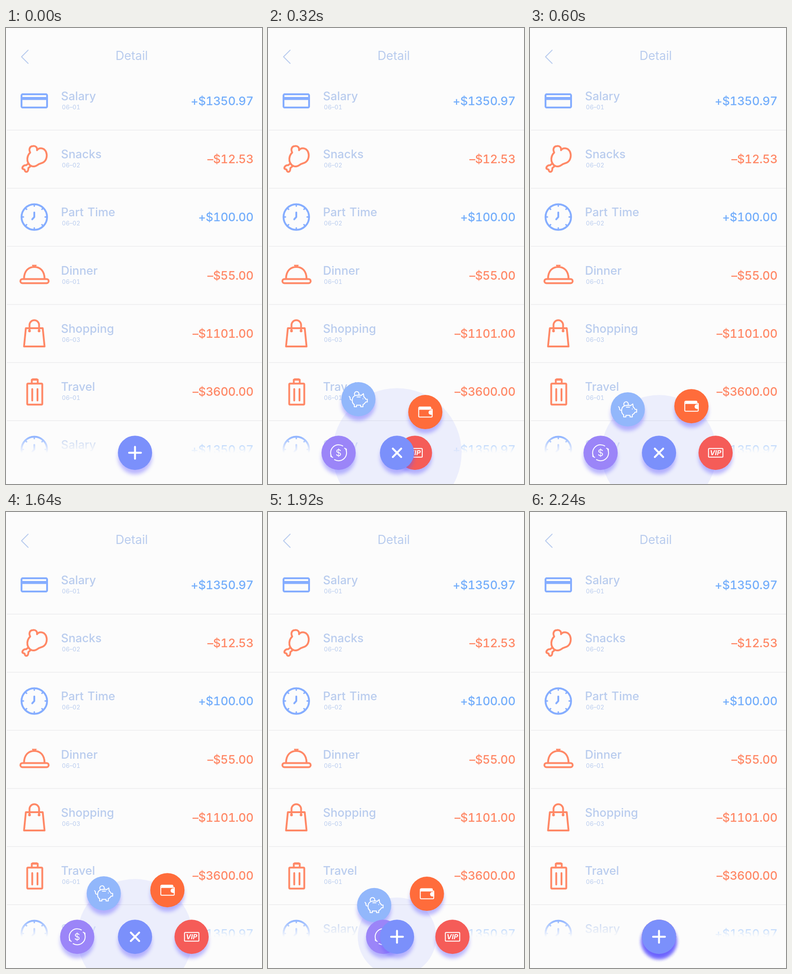
An HTML page that plays this animation: 561x998 px, repeating every 4.24 s.

```html
<!DOCTYPE html>
<html lang="en">
<head>
<meta charset="utf-8">
<title>Detail</title>
<style>
  html, body { margin: 0; width: 100%; height: 100%; overflow: hidden; background: #fcfcfc; }
  svg { display: block; width: 100%; height: 100%; }
  text { font-family: Inter, "Noto Sans", sans-serif; font-variant-numeric: tabular-nums; }
  .name { font-size: 25.5px; font-weight: 500; word-spacing: 1.5px; fill: #b9ccee; }
  .date { font-size: 13px; fill: #b9ccee; }
  .sum { font-size: 26px; font-weight: 500; letter-spacing: -.5px; text-anchor: end; }
  .line { fill: none; stroke-linecap: round; stroke-linejoin: round; }
  .white { stroke: #fff; stroke-width: 2; }
</style>
</head>
<body>
<svg viewBox="0 0 561 998">
  <defs>
    <linearGradient id="fade" x1="0" y1="0" x2="0" y2="1">
      <stop offset="0" stop-color="#fcfcfc" stop-opacity="0"/>
      <stop offset="1" stop-color="#fcfcfc"/>
    </linearGradient>
    <filter id="blur" x="-50%" y="-50%" width="200%" height="200%">
      <feGaussianBlur stdDeviation="4.5"/>
    </filter>

    <!-- List icons, centred on 0,0 -->
    <g id="card">
      <rect x="-28" y="-14.2" width="56" height="29" rx="2.5"/>
      <path d="M-28-5H28" stroke-width="6.5" stroke-linecap="butt"/>
    </g>
    <g id="snack">
      <path d="M-9-14C-13-22-9-28-3-28C3-29 7-25 6-19C10-25 20-25 25-17C29-9 28 3 19 8C15 10 12 10 9 12C4 16-2 18-8 15C-12 12-14 9-15 4C-16-3-14-9-9-14Z"/>
      <path d="M-13 10L-18 14C-22 13-27 17-26 21C-25 23-22 22-21 24C-21 27-19 29-16 28C-13 27-13 22-13 20L-7 15"/>
    </g>
    <g id="clock">
      <circle r="28"/>
      <circle r="24.5" pathLength="8" stroke-linecap="butt" stroke-dasharray=".16 .84" stroke-dashoffset=".08"/>
      <path d="M0-10V0L-4.500 5"/>
    </g>
    <g id="dish">
      <path d="M-22.500 8C-22.500-9-13-18 0-18S22.500-9 22.500 8"/>
      <path d="M-4-21.500H4L0-18Z" stroke-width="2.500"/>
      <rect x="-30.500" y="8.500" width="62" height="9" rx="4.500"/>
    </g>
    <g id="bag">
      <path d="M-18.500-11H18.500L22.500 29H-22.500Z"/>
      <path d="M-10.500-5V-18A10.500 10.500 0 0 1 10.500-18V-5"/>
      <path d="M-10.500-5v0M10.500-5v0" stroke-width="6"/>
    </g>
    <g id="case">
      <rect x="-15.500" y="-17" width="33" height="46" rx="2"/>
      <path d="M-5.500-17V-25.500H7.500V-17M-3.500-26.500H5.500M-4.500-5V20M7-5V20"/>
    </g>
  </defs>

  <path class="line" d="M48.500 48.500L34 63L48.500 77.500" stroke="#b9ccee" stroke-width="2"/>
  <text x="275.500" y="69.500" text-anchor="middle" font-size="26.500" fill="#b9ccee">Detail</text>
  <g id="list"></g>
  <rect y="890" width="561" height="40" fill="url(#fade)"/>
  <rect y="930" width="561" height="68" fill="#fcfcfc"/>

  <circle id="halo" cx="282.700" cy="929.700" fill="#7b8fff" fill-opacity=".12"/>

  <g id="vip" class="item" data-color="#f55c58">
    <rect class="line white" x="-15.500" y="-9.500" width="31.500" height="19" rx="1.500" stroke-width="1.500"/>
    <text y="5.500" text-anchor="middle" font-size="15" font-weight="700" font-style="italic" fill="#fff">VIP</text>
  </g>
  <g id="wallet" class="item" data-color="#ff6c3b">
    <path class="line white" d="M-14.500-9V9Q-14.500 11-12.500 11H13Q15 11 15 9V-6H-13Q-14.500-7-14.500-9Q-14-11-12-11H10Q12-11 12-9V-6"/>
    <path d="M-13-11H11V-6H-13ZM16-4H12A4.500 4.500 0 0 0 12 6H16Z" fill="#fff"/>
  </g>
  <g id="pig" class="item" data-color="#92b7fb">
    <path class="line white" d="M-13-1C-11-9-3-9 4-9L6-8L11-12L12-5Q15-3 16 0H19.500V6H16Q14 10 10 12V16.500H5V13H-4V16.500H-9V12Q-15 8-13-1ZM-14 2Q-19 2-18-3L-20-6M-3-5H4M10-1v0"/>
    <path class="line white" d="M-8-9A5 5 0 1 1 1-10"/>
  </g>
  <g id="cash" class="item" data-color="#9b85f8">
    <path class="line white" d="M-15 9A17.500 17.500 0 0 1 9-15M15-9A17.500 17.500 0 0 1-9 15M-17 3V8L-13 10M17-3V-8L13-10"/>
    <text y="7.200" text-anchor="middle" font-size="20" fill="#fff">$</text>
  </g>
  <g id="main" class="item" data-color="#7b90fb" transform="translate(282.700 929.700)">
    <path id="plus" class="line" d="M-13 0H13M0-13V13" stroke="#fff" stroke-width="4.200"/>
  </g>
</svg>
<script>
const $ = id => document.getElementById(id);
const BLUE = "#85adff", ORANGE = "#ff8866";

const rows = [
  ["card", "Salary", "06–01", "+$1350.97"],
  ["snack", "Snacks", "06–02", "–$12.53"],
  ["clock", "Part Time", "06–02", "+$100.00"],
  ["dish", "Dinner", "06–01", "–$55.00"],
  ["bag", "Shopping", "06–03", "–$1101.00"],
  ["case", "Travel", "06–01", "–$3600.00"],
  ["clock", "Salary", "06–01", "+$1350.97"]
];
$("list").innerHTML = rows.map(([icon, name, date, sum], i) => {
  const gain = sum[0] === "+";
  return `<g transform="translate(0 ${127.2 * i})">
    <use class="line" href="#${icon}" x="62" y="159.300" stroke="${gain ? BLUE : ORANGE}" stroke-width="4"/>
    <text class="name" x="120.500" y="158">${name}</text>
    <text class="date" x="122.500" y="178">${date}</text>
    <text class="sum" x="542" y="169" fill="${gain ? "#74aefb" : ORANGE}">${sum}</text>
    <path d="M2 223.500H561" stroke="#e5e5e7"/></g>`;
}).join("");

document.querySelectorAll(".item").forEach(g => g.insertAdjacentHTML("afterbegin",
  `<circle cy="10" r="37" fill="#6258ff" opacity=".42" filter="url(#blur)"/>
   <circle r="37.500" fill="${g.dataset.color}"/>`));

// Final offset from the main button, and how far past it the item swings
const items = [
  { el: $("cash"), x: -128, y: 0, peak: 1.17 },
  { el: $("pig"), x: -68.5, y: -95, peak: 1.235 },
  { el: $("wallet"), x: 71, y: -102, peak: 1.18 },
  { el: $("vip"), x: 124, y: 0, peak: 1.224 }
];

const LOOP = 4240, STEP = 40, CLOSE = 1600, STAGGER = 80;

function smooth(p) {
  p = Math.max(0, Math.min(1, p));
  return p * p * (3 - 2 * p);
}
const swing = (t, peak) => peak * smooth(t / 240) + (1 - peak) * smooth((t - 240) / 80);
const retreat = t => t > 0 ? smooth(2 ** ((t - 364) / 80)) : 0;

function draw(t) {
  items.forEach(({ el, x, y, peak }, i) => {
    const local = t - i * STAGGER;
    const k = swing(local, peak) * (1 - retreat(local - CLOSE));
    el.setAttribute("visibility", local > 0 ? "visible" : "hidden");
    el.setAttribute("transform", `translate(${282.7 + x * k} ${929.7 + y * k})`);
  });
  const grow = 120.5 * smooth(t / 240) - 30 * smooth((t - 240) / 160);
  $("halo").setAttribute("r", 36 + grow * (1 - smooth((t - 1720) / 430)));
  const turn = smooth((t - 80) / 240) - smooth((t - 1680) / 240);
  $("plus").setAttribute("transform", `rotate(${-45 * turn})`);
}

let start;
function tick(now) {
  start ??= now;
  draw(Math.floor((now - start) % LOOP / STEP) * STEP);
  requestAnimationFrame(tick);
}
draw(0);
requestAnimationFrame(tick);
</script>
</body>
</html>
```
